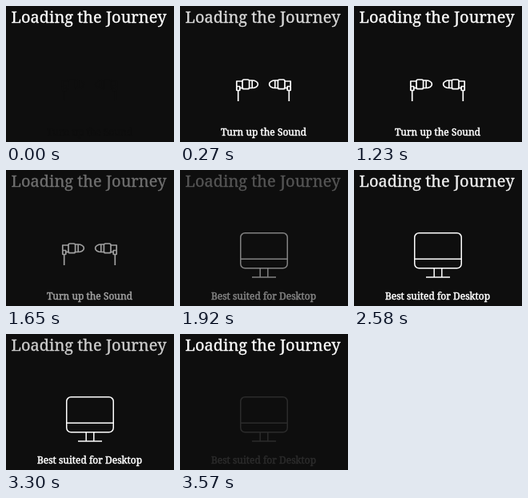
An HTML page with a canvas that plays this animation: 210x170 px, repeating every 3600 ms.

```html
<!DOCTYPE html>
<html lang="en">
<head>
<meta charset="utf-8">
<title>Loading</title>
<style>
  html, body { margin: 0; width: 100%; height: 100%; overflow: hidden; background: #0e0e0e; }
  canvas { display: block; }
</style>
</head>
<body>
<canvas id="stage" width="210" height="170"></canvas>
<script>
const ctx = document.getElementById('stage').getContext('2d');
const LOOP = 3600, SCENE = 1800, FADE = 250, PULSE = 600;
const BACKGROUND = 14;

const bezier = (a, b, u) => 3 * a * u * (1 - u) ** 2 + 3 * b * u * u * (1 - u) + u ** 3;

// The CSS "ease" curve: cubic-bezier(.25, .1, .25, 1)
function ease(x) {
  let low = 0, high = 1;
  for (let i = 0; i < 24; i++) {
    const mid = (low + high) / 2;
    if (bezier(0.25, 0.25, mid) < x) low = mid; else high = mid;
  }
  return bezier(0.1, 1, low);
}

// Alternating pulse: bright at 0, dark after one PULSE
function titleOpacity(t) {
  return ease(Math.abs(1 - (t % (2 * PULSE)) / PULSE));
}

function sceneOpacity(t) {
  const local = t % SCENE;
  return Math.min(1, local / FADE, (SCENE - local) / FADE);
}

// Blend white into the background so that overlapping strokes stay even
function setOpacity(opacity) {
  const level = Math.round(BACKGROUND + (255 - BACKGROUND) * opacity);
  ctx.fillStyle = ctx.strokeStyle = `rgb(${level}, ${level}, ${level})`;
}

function text(string, size, x, baseline, weight) {
  ctx.font = size + 'px "Noto Serif", serif';
  ctx.lineWidth = weight;
  ctx.fillText(string, x, baseline);
  ctx.strokeText(string, x, baseline);
}

const caption = string => text(string, 12, 104.5, 162, 0.5);

function line(...points) {
  ctx.beginPath();
  for (let i = 0; i < points.length; i += 2) ctx.lineTo(points[i], points[i + 1]);
  ctx.stroke();
}

function box(x, y, w, h, r) {
  ctx.beginPath();
  ctx.roundRect(x, y, w, h, r);
  ctx.stroke();
}

function earphone() {
  line(72.7, 106, 72.7, 119);
  box(70.8, 100.5, 4, 5, 0.5);
  line(70.8, 100.5, 70.8, 94, 78, 94);
  line(74.8, 102.5, 78, 102.5);
  box(78, 92, 8.6, 11.7, 2);
  ctx.beginPath();
  ctx.moveTo(86.6, 93);
  ctx.lineTo(90, 93);
  ctx.bezierCurveTo(94, 93, 97.4, 95, 97.4, 97.8);
  ctx.bezierCurveTo(97.4, 100.6, 94, 102.5, 90, 102.5);
  ctx.lineTo(86.6, 102.5);
  ctx.stroke();
  line(90.2, 93, 90.2, 102.5);
}

function earphones() {
  ctx.lineWidth = 1.7;
  earphone();
  ctx.save();
  ctx.translate(209, 0);
  ctx.scale(-1, 1);
  earphone();
  ctx.restore();
  caption('Turn up the Sound');
}

function desktop() {
  ctx.lineWidth = 1.5;
  box(75.75, 78.75, 58.5, 44.1, 5.5);
  line(75.75, 111.25, 134.25, 111.25);
  line(100.2, 122.85, 100.2, 134);
  line(109.8, 122.85, 109.8, 134);
  line(90, 134, 120, 134);
  caption('Best suited for Desktop');
}

function draw(now) {
  const t = now % LOOP;
  setOpacity(0);
  ctx.fillRect(0, 0, 210, 170);
  ctx.textAlign = 'center';
  ctx.lineJoin = 'round';

  setOpacity(titleOpacity(t));
  text('Loading the Journey', 20, 103.6, 21, 0.3);

  setOpacity(sceneOpacity(t));
  if (t < SCENE) earphones(); else desktop();
}

let start;
function frame(now) {
  start ??= now;
  draw(now - start);
  requestAnimationFrame(frame);
}
draw(0);
requestAnimationFrame(frame);
</script>
</body>
</html>
```
